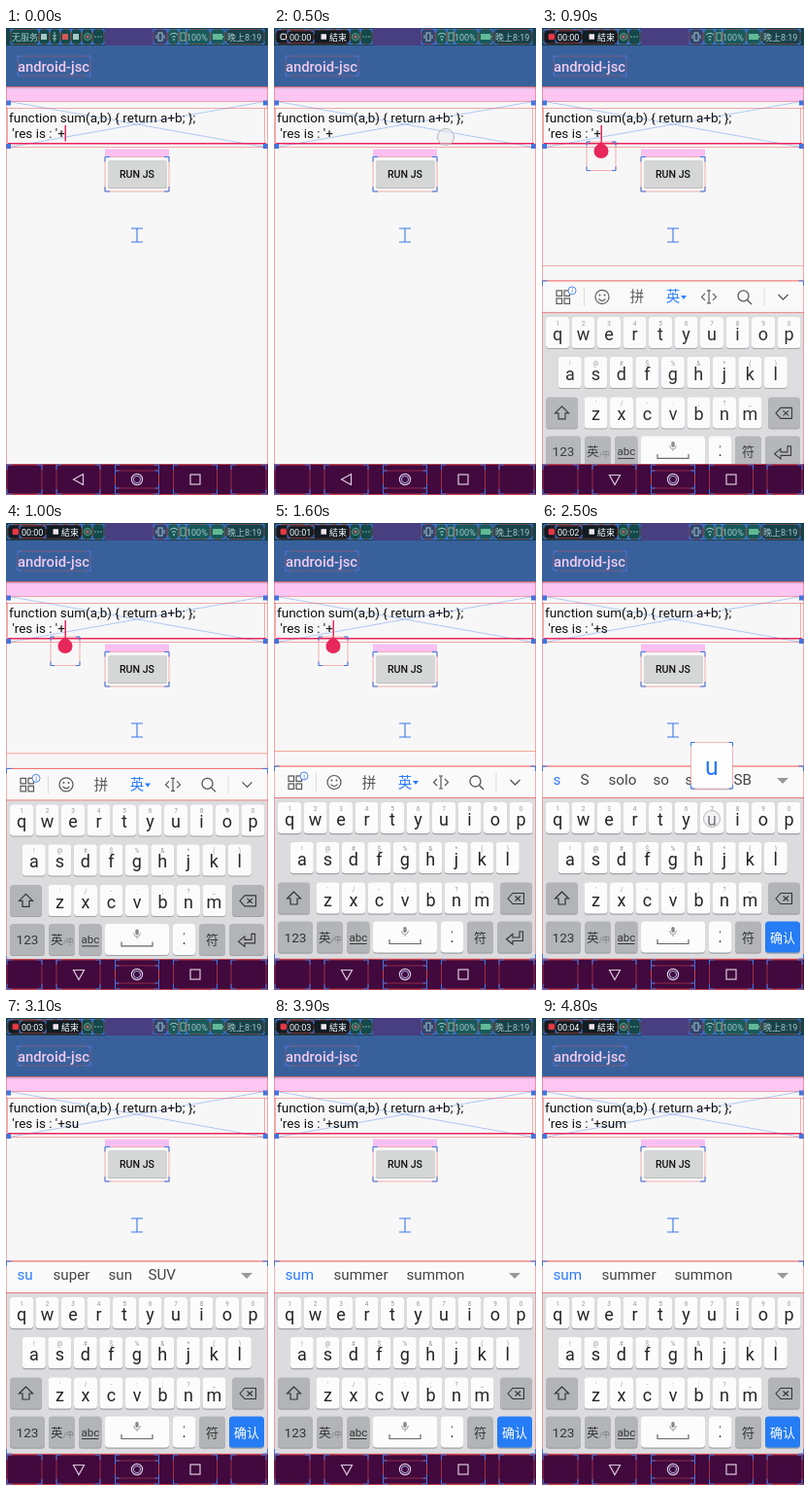
An HTML page for the animation above (5100 ms loop, 270 by 480 pixels).

```html
<!DOCTYPE html>
<html lang="en">
<head>
<meta charset="utf-8">
<title>android-jsc</title>
<style>
  html, body { margin: 0; width: 100%; height: 100%; overflow: hidden; background: #f7f7f8; }
  svg { display: block; width: 100vw; height: 100vh; }
  text { font-family: Roboto, "Noto Sans CJK SC", "Noto Sans CJK", sans-serif; white-space: pre; }
</style>
</head>
<body>
<svg id="stage" viewBox="0 0 270 480" preserveAspectRatio="none"></svg>
<script>
const LOOP = 5100, RED = '#ef5350', BLUE = '#3b78e7', ACCENT = '#e8275a', INK = '#252525';

const rect = (x, y, w, h, fill, more = '') =>
  `<rect x="${x}" y="${y}" width="${w}" height="${h}" fill="${fill}" ${more}/>`;
const line = (d, color, width = 1, more = '') =>
  `<path d="${d}" fill="none" stroke="${color}" stroke-width="${width}" ${more}/>`;
const shape = (d, fill) => `<path d="${d}" fill="${fill}"/>`;
const circle = (x, y, r, fill, more = '') => `<circle cx="${x}" cy="${y}" r="${r}" fill="${fill}" ${more}/>`;
const text = (s, x, y, size, fill = INK, more = '') =>
  `<text x="${x}" y="${y}" font-size="${size}" fill="${fill}" ${more}>${s}</text>`;
const mid = (s, x, y, size, fill, more = '') => text(s, x, y, size, fill, 'text-anchor="middle" ' + more);
const group = (id, body, more = '') => `<g id="${id}" ${more}>${body}</g>`;

// Layout outline: thin red box with blue corner ticks
function bounds(x, y, w, h, tick = 4, redWidth = .6) {
  const r = x + w, b = y + h;
  return rect(x, y, w, h, 'none', `stroke="${RED}" stroke-width="${redWidth}" stroke-opacity=".75"`) +
    line(`M${x} ${y + tick}V${y}H${x + tick}M${r - tick} ${y}H${r}V${y + tick}` +
         `M${r} ${b - tick}V${b}H${r - tick}M${x + tick} ${b}H${x}V${b - tick}`, BLUE, 1);
}

function statusBar() {
  const pale = '#a9c6c4';
  const spans = [[5, 29], [34, 11], [45, 11], [56, 11], [67, 11], [78, 11], [89, 12],
    [152, 14], [167, 11], [178, 8], [186, 24], [211, 14], [227, 39]];
  return rect(0, 0, 270, 18, '#17424b') + rect(5, 1, 97, 16, '#124a4b') +
    rect(102, 0, 50, 18, '#473f80') + rect(152, 0, 15, 18, '#2d4470') + rect(167, 1, 59, 16, '#175a5c') +
    spans.map(([x, w]) => bounds(x, 1.5, w, 15, 3, .5)).join('') +
    group('carrier', text('无服务', 6, 13, 9, pale) +
      rect(36, 6, 6, 6, pale) + line('M50 4V14M48 7L50 9 52 7M48 11H52', pale, .9) +
      rect(58, 6, 6, 6, '#d65757') + rect(69, 6, 6, 6, pale)) +
    circle(84, 9, 3.500, 'none', 'stroke="#5fa88e" stroke-width="1"') + rect(82.500, 7.500, 3, 3, '#b8666a') +
    [92, 95, 98].map(x => circle(x, 9, .7, pale)).join('') +
    rect(157, 5, 4, 8, 'none', `stroke="${pale}" stroke-width="1"`) + line('M155 7V11M163 7V11', pale, .9) +
    line('M169 7Q173 3.500 177 7M171 9.500Q173 7.500 175 9.500', pale, 1) + circle(173, 12, .9, pale) +
    rect(180, 5, 5, 8, 'none', `stroke="${pale}" stroke-width=".8"`) +
    text('100%', 186, 13, 9, pale) +
    rect(213, 6, 10, 6, '#62b896') + rect(223, 8, 1.2, 2, '#62b896') +
    text('晚上8:19', 228, 13, 9, pale);
}

function recorder() {
  return rect(2, 2, 76, 15, '#101c23') + bounds(2, 2, 76, 14, 3, .5) + bounds(14, 3, 27, 12, 3, .5) +
    rect(7, 6.2, 5.5, 5.5, 'none', 'id="dot" rx="1" stroke-width="1"') +
    text('00:00', 16, 12.8, 9, '#fff', 'id="timer"') +
    rect(48.500, 6.2, 5.5, 5.5, '#f1e4ea') +
    text('結束', 57, 13, 9, '#fff');
}

function appBar() {
  return rect(0, 60, 270, 2.500, '#4a4458', 'opacity=".18"') + rect(0, 18, 270, 42.500, '#38619c') +
    text('android-jsc', 12, 44.800, 14.800, '#f0c9ee', 'font-weight="500"') +
    bounds(12, 29, 75, 20, 4, .5) + line('M0 60.500H270', RED, .7);
}

function content() {
  const corners = [[0, 74.500], [265, 74.500], [0, 119], [265, 119]];
  return rect(0, 61, 270, 14.500, '#fcc6f3') +
    line('M0 75L270 123M270 75L0 123', '#a9c2f0', .9) +
    line('M0 75.500H270M0 82.500H270M0 122.500H270M1.500 82V123M266.500 82V123', RED, .6, 'stroke-opacity=".8"') +
    line('M2 118.700H268', ACCENT, 1.500) +
    corners.map(([x, y]) => rect(x, y, 5, 5, BLUE)).join('') +
    text('function sum(a,b) { return a+b; };', 3, 97, 13.500, '#111') +
    text('', 3, 112.500, 13.500, '#111', 'id="entry"') +
    rect(60.500, 100, 1.500, 16.500, ACCENT, 'id="caret"') +
    rect(102, 124.500, 66, 7.500, '#fbbff2') +
    rect(105, 137, 61, 28, '#bbbcbd', 'rx="2"') + rect(105, 136, 61, 28, '#d5d6d6', 'rx="2"') +
    bounds(102, 132.500, 66, 35.500, 5) +
    mid('RUN JS', 135, 154.300, 10.600, '#111', 'font-weight="500"') +
    line('M129 206H141M129 220H141M135 206V220', BLUE, 1.100) +
    line('M.5 60V448M269.500 60V448', RED, .7, 'stroke-opacity=".7"');
}

function navBar() {
  const pale = '#dcc8de', edges = [[1, 36], [52, 45], [112.500, 45], [172.500, 45], [232, 36]];
  return rect(0, 448, 270, 32, '#41093d') + line('M0 448.500H270M0 479.500H270', RED, .7) +
    edges.map(([x, w]) => bounds(x, 449, w, 30, 5, .7)).join('') +
    bounds(112.500, 455, 45, 18, 4, .6) +
    line('M79.500 458.500V469.500L69.500 464Z', pale, 1.200, 'id="back"') +
    circle(135, 464, 5.600, 'none', `stroke="${pale}" stroke-width="1.2"`) +
    circle(135, 464, 3.600, 'none', 'stroke="#a9b4f0" stroke-width="1"') +
    rect(190, 459, 10, 10, 'none', `stroke="${pale}" stroke-width="1.2"`);
}

function key(x, y, w, fill = '#fcfcfc') {
  return rect(x, y + 1.2, w, 32, '#9fa1a5', 'rx="3.5"') + rect(x, y, w, 32, fill, 'rx="3.5"');
}

function letters(keys, hints, x0, y) {
  return [...keys].map((c, i) => {
    const x = x0 + 26.500 * i;
    return key(x - 12, y, 24) + mid(hints[i], x, y + 9, 6.500, '#999') + mid(c, x, y + 24, 18, INK);
  }).join('');
}

function toolbar() {
  const ink = '#555';
  const squares = [[15, 260], [23, 260], [15, 268], [23, 268]];
  return squares.map(([x, y]) => rect(x, y, 5.500, 5.500, 'none', `stroke="${ink}" stroke-width="1.2"`)).join('') +
    circle(31, 260, 4, '#fff', `stroke="${BLUE}" stroke-width=".9"`) + mid('i', 31, 262.600, 7, BLUE) +
    circle(62, 266.500, 7, 'none', `stroke="${ink}" stroke-width="1.2"`) +
    circle(59.500, 264.500, 1, ink) + circle(64.500, 264.500, 1, ink) + line('M58.500 268.500Q62 272.500 65.500 268.500', ink, 1.100) +
    mid('拼', 98, 271.500, 14.500, ink) + mid('英', 135, 271.500, 14.500, '#2979ff') + shape('M143 265H149L146 269Z', '#2979ff') +
    line('M168 263L164.500 266.500 168 270M176 263L179.500 266.500 176 270M172 260V273M170 260H174M170 273H174', ink, 1.200) +
    circle(207.500, 265.500, 5.500, 'none', `stroke="${ink}" stroke-width="1.3"`) + line('M211.500 269.500L216 274', ink, 1.400) +
    line('M243.500 264L248.500 269 253.500 264', ink, 1.400) +
    line('M43.500 257V276M229 257V276', '#d5d5d8', .8) +
    line('M0 234.500H270', '#f5846d', .7);
}

function keyboard() {
  const gray = '#b2b4b7';
  return rect(0, 250, 270, 198, '#dcdcdf') + rect(0, 250, 270, 32.500, '#fafafa') +
    group('tools', toolbar()) + group('words', '') +
    line('M0 250H270M0 282.500H270', RED, .7) + bounds(.5, 250, 269, 198, 5) +
    letters('qwertyuiop', '1234567890', 16, 287) +
    letters('asdfghjkl', '!@#$%&*()', 28.800, 328) +
    letters('zxcvbnm', "'/-:;?_", 55.500, 369.500) +
    key(4, 369.500, 33, gray) + line('M20.500 379L13.500 386H17V392H24V386H27.500Z', '#333', 1.200) +
    key(233, 369.500, 33, gray) + line('M241 386L246 380.500H257.500V391.500H246ZM248.500 383.500L254 388.500M254 383.500L248.500 388.500', '#333', 1.100) +
    key(4, 409.500, 36, gray) + mid('123', 22, 430.500, 13.500, '#333') +
    key(44, 409.500, 27, gray) + text('英', 46, 430.500, 12.500, '#333') + text('/中', 58.800, 431, 8, '#777') +
    key(75, 409.500, 23.500, gray) + mid('abc', 86.800, 429.500, 11.500, '#333') + line('M78 432.500H95.500', '#333', 1) +
    key(102, 409.500, 66) +
    rect(133.300, 415, 3.400, 6, '#888', 'rx="1.7"') + line('M131.500 419Q132 423 135 423T138.500 419M135 423V425', '#888', .8) +
    line('M119 428V432.500H151V428', '#666', 1.200) +
    key(172, 409.500, 23) + mid('.', 183.500, 430.500, 16) + mid(',', 183.500, 420, 11, '#666') +
    key(199, 409.500, 27, gray) + mid('符', 212.500, 430.500, 13, '#333') +
    group('enter', key(230, 409.500, 36, gray) + line('M253 420H256.500V429.500H246V433L239.500 427.800 246 422.500V426H253Z', '#333', 1.100)) +
    group('confirm', key(230, 409.500, 36, '#267cf4') + mid('确认', 248, 430.500, 13, '#fff'));
}

const handle = shape('M61 116.500L66.500 121.500A7.500 7.500 0 1 1 55.500 121.500Z', ACCENT) + bounds(46, 117, 30, 29.500, 4);
const popup = rect(-21.500, 1, 43, 48, '#9a9ca0', 'rx="4" opacity=".5"') + rect(-21.500, 0, 43, 47.500, '#fdfdfd', 'rx="4"') +
  bounds(-21.500, 0, 43, 47.500, 4, .5) + mid('', 0, 33, 25, '#2979ff', 'id="big"');

document.getElementById('stage').innerHTML =
  `<defs><clipPath id="above"><rect width="270" height="448"/></clipPath></defs>` +
  rect(0, 0, 270, 480, '#f7f7f8') + content() + appBar() + statusBar() + group('rec', recorder()) +
  group('handle', handle) +
  `<g clip-path="url(#above)">${group('keys', keyboard())}</g>` + navBar() +
  group('popup', popup) +
  circle(0, 0, 8.500, '#e8e8ee', 'id="touch" fill-opacity=".45" stroke="#b5b5be" stroke-width="1"');

// Each table holds [start ms, value]
const tracks = {
  entry: [[0, ''], [1900, 's'], [2600, 'su'], [3500, 'sum']],
  caret: [[0, 1], [300, 0], [700, 1], [1200, 0], [1600, 1], [2400, 0], [2600, 1], [3100, 0], [3500, 1], [3800, 0], [4200, 1], [4700, 0]],
  timer: [[0, ''], [300, '00:00'], [1600, '00:01'], [2400, '00:02'], [3100, '00:03'], [4200, '00:04']],
  handle: [[0, 0], [700, 1], [2000, .8], [2100, 0]],
  lift: [[0, 0], [700, .3], [800, .75], [900, .95], [1000, .988], [1100, 1]],
  words: [[0, 0], [1900, [['s', 12], ['S', 40], ['solo', 69], ['so', 115], ['sorry', 148], ['SB', 198]]],
    [2700, [['su', 12], ['super', 49], ['sun', 106], ['SUV', 147]]],
    [3600, [['sum', 12], ['summer', 62], ['summon', 137]]]],
  popup: [[0, 0], [1800, ['s', 55.500, 267.500]], [2200, 0], [2500, ['u', 175, 225.500]], [2800, 0], [3400, ['m', 215, 308]], [3700, 0]],
  touch: [[0, 0], [400, [177, 112]], [600, 0], [1800, [45, 346]], [2200, 0], [2500, [175, 304]], [2800, 0], [3400, [215, 383]], [3700, 0]]
};
const at = (name, t) => tracks[name].findLast(([start]) => start <= t)[1];
const el = id => document.getElementById(id);
const show = (id, on) => el(id).setAttribute('opacity', +on);
const move = (id, x, y) => el(id).setAttribute('transform', `translate(${x} ${y})`);
const caretX = { '': 60.5, s: 67.5, su: 75, sum: 86.800 };
let shown;

function draw(t) {
  const typed = at('entry', t), timer = at('timer', t), lift = at('lift', t);
  const words = at('words', t), pop = at('popup', t), touch = at('touch', t);
  el('entry').textContent = " 'res is : '+" + typed;
  el('caret').setAttribute('x', caretX[typed]);
  show('caret', at('caret', t));

  show('rec', timer !== '');
  show('carrier', timer === '');
  el('timer').textContent = timer;
  const red = t >= 700;
  el('dot').setAttribute('stroke', red ? '#e53945' : '#fff');
  el('dot').setAttribute('fill', red ? '#e53945' : 'none');

  show('handle', at('handle', t));
  show('keys', lift);
  move('keys', 0, 198 * (1 - lift));
  el('back').setAttribute('transform', lift ? 'rotate(-90 75 464)' : '');
  show('tools', !words);
  show('enter', !words);
  show('confirm', words !== 0);
  if (words !== shown) {
    shown = words;
    el('words').innerHTML = words ? words.map(([s, x], i) => text(s, x - .5, 269.300, 15.200, i ? '#444' : '#2979ff')).join('') +
      shape('M242 262H254L248 268Z', '#999') : '';
  }
  show('popup', pop !== 0);
  if (pop) { el('big').textContent = pop[0]; move('popup', pop[1], pop[2]); }
  show('touch', touch !== 0);
  if (touch) move('touch', ...touch);
}

const begin = performance.now();
function tick() {
  draw((performance.now() - begin) % LOOP);
  requestAnimationFrame(tick);
}
tick();
</script>
</body>
</html>
```
